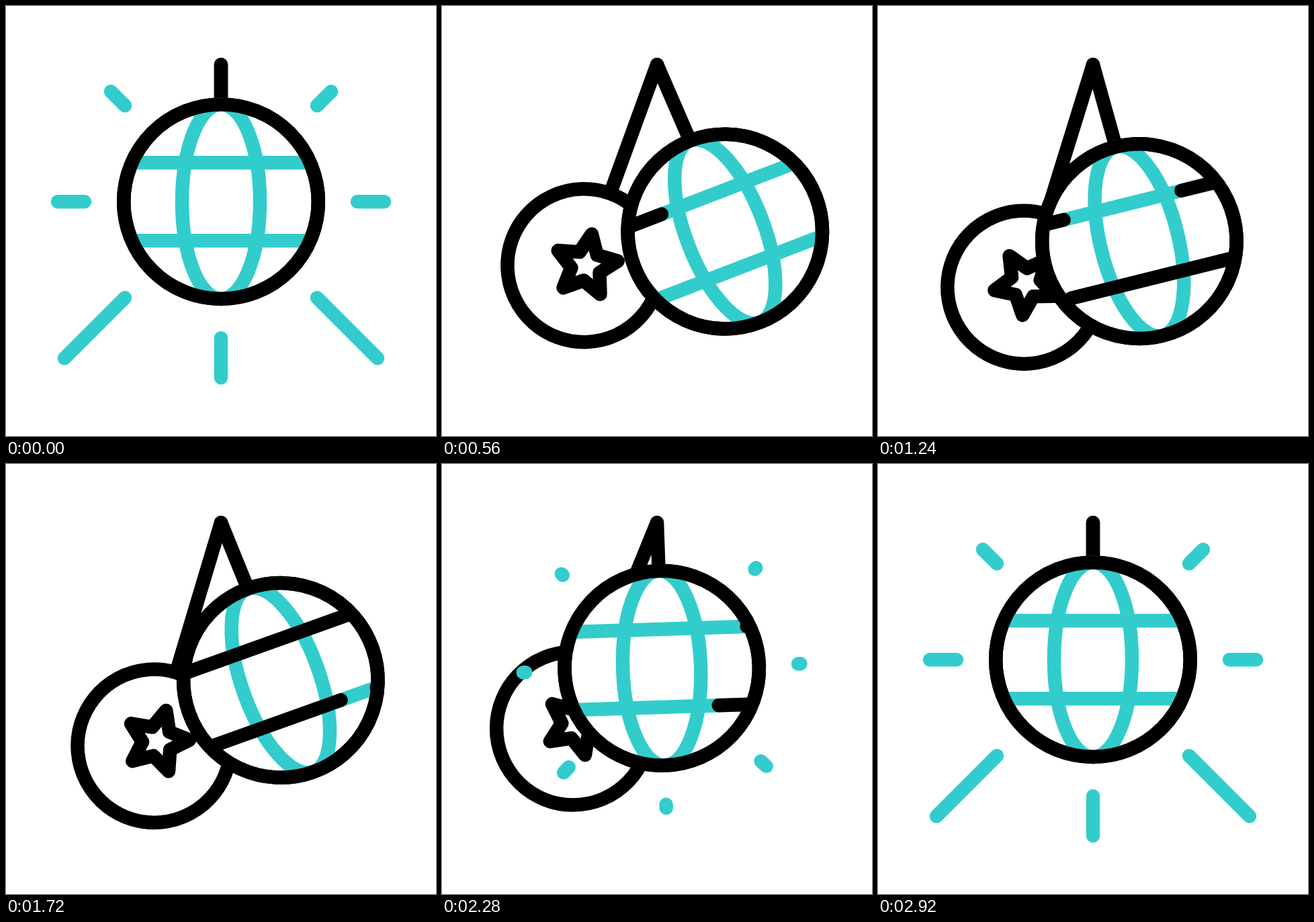
An HTML page with a canvas that plays this animation: 640x640 px, repeating every 3 s.

```html
<!DOCTYPE html>
<html lang="en">
<head>
<meta charset="utf-8">
<title>Disco ball</title>
<style>
html, body { margin: 0; height: 100%; overflow: hidden; background: #fff; }
canvas { display: block; }
</style>
</head>
<body>
<canvas id="stage" width="640" height="640"></canvas>
<script>
const ctx = document.getElementById('stage').getContext('2d');
const TEAL = '#33cccc', BLACK = '#000', WHITE = '#fff';
const LOOP = 3000, STEP = 40, RAD = Math.PI / 180;
const PIVOT_X = 320, PIVOT_Y = 87.2, REST = 204;
const BALL_R = 144.8, SMALL_R = 114, LINE_Y = 58, LINE_X = 131;

// Dark strokes that run along the two lines: [y, head start, tail start]
const SWEEPS = [[-LINE_Y, 400, 842], [-LINE_Y, 1123, 1755],
  [LINE_Y, 618, 1167], [LINE_Y, 1329, 1875]];
const SWEEP_TIME = 558;

function ease(t, start, duration) {
  const x = Math.min(1, Math.max(0, (t - start) / duration));
  return x * x * (3 - 2 * x);
}

function line(x1, y1, x2, y2, color) {
  ctx.strokeStyle = color;
  ctx.beginPath();
  ctx.moveTo(x1, y1);
  ctx.lineTo(x2, y2);
  ctx.stroke();
}

function oval(rx, ry, color, fill) {
  ctx.strokeStyle = color;
  ctx.beginPath();
  ctx.ellipse(0, 0, rx, ry, 0, 0, 2 * Math.PI);
  if (fill) {
    ctx.fillStyle = fill;
    ctx.fill();
  }
  ctx.stroke();
}

// Draws a rope to the ball's top, then the ball around its own centre.
function hang(swing, tilt, length, radius, draw) {
  const x = PIVOT_X + length * Math.sin(swing * RAD);
  const y = PIVOT_Y + length * Math.cos(swing * RAD);
  const topX = x - radius * Math.sin(tilt * RAD);
  const topY = y - radius * Math.cos(tilt * RAD);
  line(PIVOT_X, PIVOT_Y, topX, topY, BLACK);
  ctx.save();
  ctx.translate(x, y);
  ctx.rotate(-tilt * RAD);
  draw();
  ctx.restore();
}

function drawStar(spin) {
  ctx.translate(3.8, -4.6);
  ctx.rotate(spin * RAD);
  ctx.translate(-1.3, 3.4);
  ctx.beginPath();
  for (let i = 0; i < 10; i++) {
    const r = i % 2 ? 22.5 : 47.5, a = i * 36 * RAD;
    ctx.lineTo(r * Math.sin(a), -r * Math.cos(a));
  }
  ctx.closePath();
  ctx.stroke();
}

function drawRays(grow) {
  if (grow <= 0) return;
  for (const x of [-1, 0, 1]) {
    for (const y of [-1, 0, 1]) {
      if (!x && y < 1) continue;
      const diagonal = x && y;
      const inner = diagonal ? 143 : 203;
      const length = diagonal ? (y < 0 ? 21 : 90) : (x ? 40 : 59);
      const outer = inner + length * grow;
      line(x * inner, y * inner, x * outer, y * outer, TEAL);
    }
  }
}

function drawBall(t) {
  oval(BALL_R, BALL_R, BLACK, WHITE);
  oval(LINE_Y, BALL_R, TEAL);
  for (const y of [-LINE_Y, LINE_Y]) line(-LINE_X, y, LINE_X, y, TEAL);
  for (const [y, headStart, tailStart] of SWEEPS) {
    const head = ease(t, headStart, SWEEP_TIME), tail = ease(t, tailStart, SWEEP_TIME);
    if (head > tail) line((2 * tail - 1) * LINE_X, y, (2 * head - 1) * LINE_X, y, BLACK);
  }
  oval(BALL_R, BALL_R, BLACK);
}

function drawSmall(t) {
  const out = ease(t, 190, 520), back = ease(t, 2165, 550);
  const swing = -25 * (out - back) + 9.5 * (ease(t, 830, 562) - ease(t, 1650, 320));
  const spin = -10 + 9 * ease(t, 560, 320) + 144 * ease(t, 850, 630);
  hang(swing, swing, REST + 143 * (out - back), SMALL_R, () => {
    oval(SMALL_R, SMALL_R, BLACK, WHITE);
    drawStar(spin);
  });
}

function drawBig(t) {
  const swing = 24.2 * ease(t, 190, 450) - 10 * ease(t, 720, 600)
    + 8.8 * ease(t, 1330, 585) - 31 * ease(t, 1900, 610) + 8 * ease(t, 2510, 410);
  const stretch = ease(t, 190, 440) - ease(t, 1113, 1609);
  hang(swing, swing * 0.95, REST + 69 * stretch, BALL_R, () => {
    drawRays(1 - ease(t, 195, 290) + ease(t, 2200, 440));
    drawBall(t);
  });
}

function render(now) {
  const t = Math.floor((now % LOOP) / STEP) * STEP;
  ctx.fillStyle = WHITE;
  ctx.fillRect(0, 0, 640, 640);
  ctx.lineWidth = 20.5;
  ctx.lineCap = ctx.lineJoin = 'round';
  drawSmall(t);
  drawBig(t);
}

const begin = performance.now();
function tick() {
  render(performance.now() - begin);
  requestAnimationFrame(tick);
}
tick();
</script>
</body>
</html>
```
